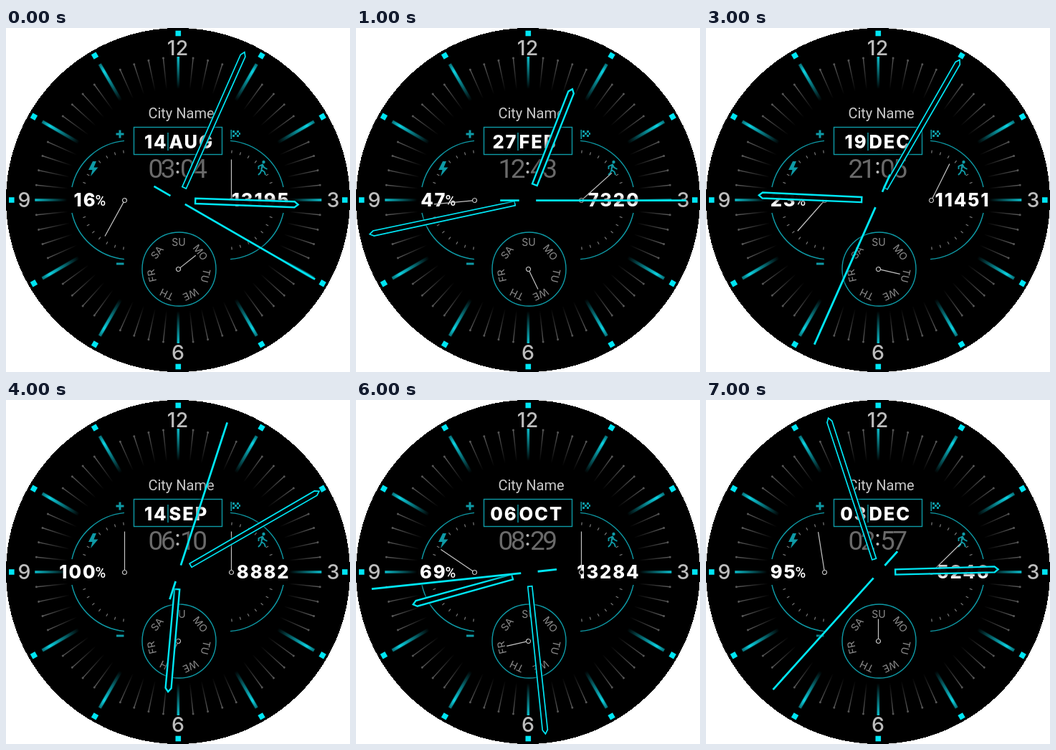
Animation, 480 px wide and 480 px high, one loop 8 s. Source, as an HTML page:

```html
<!DOCTYPE html>
<html lang="en">
<head>
<meta charset="utf-8">
<title>Watch face</title>
<style>
  html, body { margin: 0; width: 100%; height: 100%; overflow: hidden; background: #fff; }
  svg { display: block; width: 100vw; height: 100vh; }
  text { text-anchor: middle; }
  .num { font: 500 28.5px Inter, sans-serif; fill: #bdbdbd; }
  .wide { font: 800 25.5px Inter, sans-serif; letter-spacing: 1.9px; fill: #fff; }
  .end { text-anchor: end; }
  .start { text-anchor: start; }
  .city { font: 20px Roboto, sans-serif; fill: #c9c9c9; }
  .time { font: 37px Roboto, sans-serif; letter-spacing: -3.5px; fill: #6a6a6a; }
  .percent { font: 500 20px Roboto, sans-serif; fill: #fff; }
  .week { font: 14px Inter, sans-serif; fill: #8c8c8c; }
  .rim { fill: none; stroke: #0e9aa6; stroke-width: 1.4; }
  .icon { fill: #0e9aa6; }
  .glow { filter: blur(.6px); }
  .needle { fill: #000; stroke: #c4c4c4; stroke-width: 1.2; }
  .hand { fill: #000; fill-opacity: .8; stroke: #00e6f5; filter: drop-shadow(0 0 2.5px #000); }
</style>
</head>
<body>
<svg viewBox="0 0 480 480">
  <defs>
    <linearGradient id="long" gradientUnits="userSpaceOnUse" x1="0" y1="-219" x2="0" y2="-160">
      <stop offset="0" stop-color="#0cdcec" stop-opacity=".5"/>
      <stop offset=".2" stop-color="#0cdcec" stop-opacity=".95"/>
      <stop offset="1" stop-color="#0cdcec" stop-opacity="0"/>
    </linearGradient>
    <linearGradient id="short" gradientUnits="userSpaceOnUse" x1="0" y1="-200" x2="0" y2="-155">
      <stop offset="0" stop-color="#0cdcec" stop-opacity=".85"/>
      <stop offset="1" stop-color="#0cdcec" stop-opacity="0"/>
    </linearGradient>
    <linearGradient id="gray" gradientUnits="userSpaceOnUse" x1="0" y1="-199" x2="0" y2="-155">
      <stop offset="0" stop-color="#5c5c5c"/>
      <stop offset="1" stop-color="#5c5c5c" stop-opacity="0"/>
    </linearGradient>
  </defs>
  <circle cx="240" cy="240" r="240" shape-rendering="crispEdges"/>
  <g id="marks" transform="translate(240.300 240)"></g>
  <g class="num">
    <text x="239.500" y="38">12</text><text x="456.500" y="250">3</text>
    <text x="240" y="463">6</text><text x="25.500" y="250">9</text>
  </g>

  <g id="gauges"></g>
  <path class="rim" d="M165 157.400A83 83 0 0 0 92 222M92 258A83 83 0 0 0 165 322.600
    M313 157.400A83 83 0 0 1 387 222M387 258A83 83 0 0 1 313 322.600"/>
  <path class="icon" d="M153.500 146.500h4v-4h3v4h4v3h-4v4h-3v-4h-4zM154 327.500h10.500v3h-10.500z"/>
  <path class="icon" d="M121 186L115 198H120.500L118 207L128.500 194.500H122.500L126 186Z"/>
  <path class="icon" d="M313.500 142h1.500v13h-1.500zM316 143h3v3h-3zM322 143h3v3h-3zM319 146h3v3h-3zM325 146h2v3h-2zM316 149h3v3h-3zM322 149h3v3h-3z"/>
  <circle class="icon" cx="359.500" cy="187" r="2.200"/>
  <path d="M352.500 197V193L358 190.500L360 194.500L364.500 197M357.500 191L356.500 198L360.500 200.500L362 205M356.500 198L355 202L352 205"
    fill="none" stroke="#0e9aa6" stroke-width="1.900"/>

  <text class="city" x="244.500" y="126">City Name</text>
  <rect class="rim" x="178.500" y="138.500" width="123" height="38"/>
  <path class="rim" d="M226 146V171"/>
  <text class="wide end" id="day" x="225.500" y="167.500"></text>
  <text class="wide start" id="month" x="227.500" y="167.500"></text>
  <text class="time end" id="hours" x="233" y="208.500"></text>
  <text class="time start" id="minutes" x="243" y="208.500"></text>
  <g fill="#bbb"><circle cx="239.500" cy="189" r="2"/><circle cx="239.500" cy="201" r="2"/></g>

  <text class="wide end" id="battery" x="126.500" y="249"></text>
  <text class="percent start" x="124.500" y="248"> %</text>
  <text class="wide end" id="steps" x="396.500" y="249"></text>

  <circle class="rim" cx="241.500" cy="336.500" r="51.500"/>
  <g id="week" transform="translate(241 337)"></g>
  <g class="needle">
    <g id="batteryNeedle"><path d="M0 -3V-57"/><circle r="3"/></g>
    <g id="stepsNeedle"><path d="M0 -3V-57"/><circle r="3"/></g>
    <g id="weekNeedle"><path d="M0 -3V-31"/><circle r="3"/></g>
  </g>

  <g class="hand"><path id="hourHand" stroke-width="2.400" d="M-3.600 -23.500L-4 -162L0 -167L4 -162L3.600 -23.500Z"/></g>
  <g class="hand"><path id="minuteHand" stroke-width="1.700" d="M-3 -19.500L-3.600 -221L0 -226.500L3.600 -221L3 -19.500Z"/></g>
  <g class="hand"><path id="secondHand" stroke-width="2.800" d="M0 -10.500V-220M0 13V39.500"/></g>
</svg>
<script>
const $ = id => document.getElementById(id);
const repeat = (count, draw) => Array.from({ length: count }, (_, i) => draw(i)).join('');
const pad = n => String(n).padStart(2, '0');
const turn = (id, x, y, angle) => $(id).setAttribute('transform', `translate(${x} ${y}) rotate(${angle})`);

function mark(i) {
  if (i % 5) return '<path d="M-.7 -199h1.4v44h-1.4z" fill="url(#gray)"/><circle cy="-199" r="1.5" fill="#555"/>';
  const streak = i % 15 ? 'd="M-2.2 -219h4.4v59h-4.4z" fill="url(#long)"' : 'd="M-1.8 -200h3.6v45h-3.6z" fill="url(#short)"';
  return `<path class="glow" ${streak}/><rect x="-3.8" y="-236.3" width="7.6" height="7.6" fill="#00e6f5"/>`;
}
$('marks').innerHTML = repeat(60, i => `<g transform="rotate(${i * 6})">${mark(i)}</g>`);

const gaugeTicks = (x, side) => repeat(17, i => Math.abs(i - 8) < 2 ? '' :
  `<path d="M0 -66v-4" stroke="#777" stroke-width="1.2" transform="translate(${x} 240) rotate(${side * (i * 10.3 + 7.6)})"/>`);
$('gauges').innerHTML = gaugeTicks(173, -1) + gaugeTicks(306, 1);

const weekdays = ['SU', 'MO', 'TU', 'WE', 'TH', 'FR', 'SA'];
$('week').innerHTML = repeat(7, i =>
  `<text class="week" y="-33.5" transform="rotate(${i * 360 / 7})">${weekdays[i]}</text>`);

// hour, minute, second, day, month, battery, steps, steps needle angle, weekday
const scenes = [
  [3, 4, 20, 14, 'AUG', 16, 13195, 0, 1],
  [12, 43, 15, 27, 'FEB', 47, 7320, 48, 3],
  [9, 34, 48, 22, 'JUN', 32, 10, 160, 4],
  [21, 5, 34, 19, 'DEC', 23, 11451, 26.5, 2],
  [6, 10, 3, 14, 'SEP', 100, 8882, 0, 4],
  [11, 25, 2, 18, 'MAY', 54, 10764, 30, 6],
  [8, 29, 44, 6, 'OCT', 69, 13284, 0, 5],
  [2, 57, 37, 3, 'DEC', 95, 5246, 45.5, 0]
];
let shown = -1;

function show([hour, minute, second, day, month, battery, steps, stepsAngle, weekday]) {
  const labels = { day: pad(day), month, hours: pad(hour), minutes: pad(minute), battery, steps };
  for (const id in labels) $(id).textContent = labels[id];
  turn('hourHand', 240.7, 240.6, hour * 30 + minute / 2);
  turn('minuteHand', 240.7, 240.6, minute * 6);
  turn('secondHand', 240.7, 240.6, second * 6);
  turn('batteryNeedle', 165.5, 240.5, 180 + battery * 1.8);
  turn('stepsNeedle', 314.5, 240.5, stepsAngle);
  turn('weekNeedle', 240.5, 336.5, weekday * 360 / 7);
}

function tick() {
  const index = Math.floor(performance.now() / 1000) % scenes.length;
  if (index !== shown) show(scenes[shown = index]);
  requestAnimationFrame(tick);
}
tick();
</script>
</body>
</html>
```
